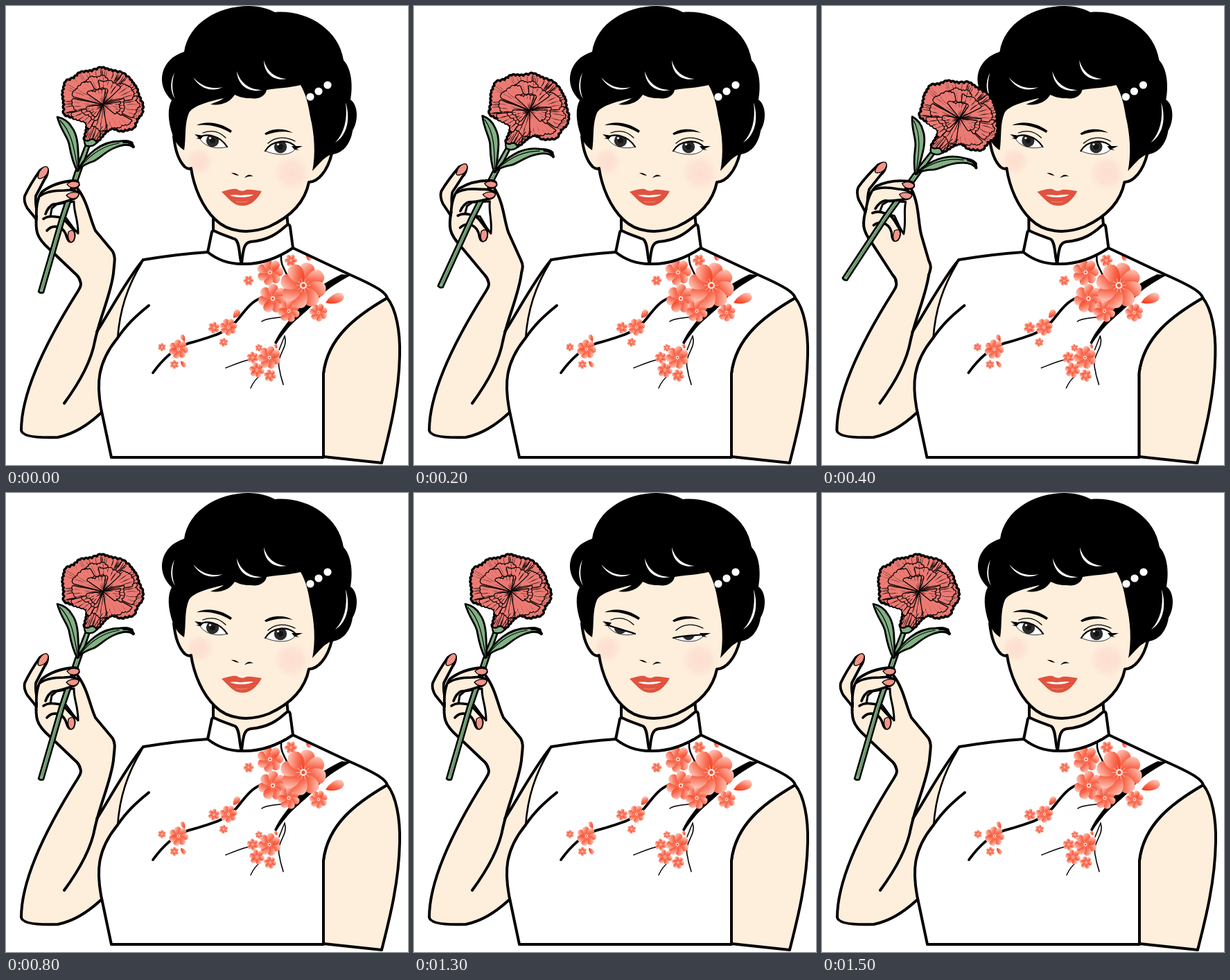
An HTML page with a canvas that plays this animation: 580x662 px, repeating every 5.5 s.

```html
<!DOCTYPE html>
<html lang="en">
<head>
<meta charset="utf-8">
<title>Woman with a carnation</title>
<style>
html, body { margin: 0; width: 100%; height: 100%; overflow: hidden; background: #fff; }
canvas { display: block; }
</style>
</head>
<body>
<canvas id="stage" width="580" height="662"></canvas>
<script>
const ctx = document.getElementById('stage').getContext('2d');
const LOOP = 5500;
const SKIN = '#feeedc', INK = '#000', GREEN = '#82b084', PINK = '#eb7a73', NAIL = '#f29488', LIP = '#e0533f';
const WRIST = [107, 400];
const JOINT = [104, 237];

// Each pose: hand turn, flower turn (degrees), place of the leaf joint, widest point of the wrist, body shift
const POSES = [
  { hand: 0, stem: 0, at: [104, 237], wrist: 360, shift: 0 },
  { hand: 5.5, stem: 8.5, at: [117, 239], wrist: 372, shift: 0 },
  { hand: 11, stem: 17.2, at: [136, 242], wrist: 373, shift: -0.6 }
];

const rad = d => d * Math.PI / 180;
const mix = (a, b, t) => a + (b - a) * t;
const mixPt = (p, q, t) => [mix(p[0], q[0], t), mix(p[1], q[1], t)];

function seeded(s) {
  return () => {
    s = (s * 1664525 + 1013904223) % 4294967296;
    return s / 4294967296;
  };
}

function fill(d, color) {
  ctx.fillStyle = color;
  ctx.fill(new Path2D(d));
}

function line(d, width = 4, color = INK) {
  ctx.lineWidth = width;
  ctx.strokeStyle = color;
  ctx.stroke(new Path2D(d));
}

function shape(d, color, width) {
  fill(d, color);
  line(d, width);
}

function disc(x, y, r, color) {
  ctx.fillStyle = color;
  ctx.beginPath();
  ctx.arc(x, y, r, 0, 7);
  ctx.fill();
}

function glow(x, y, r) {
  const g = ctx.createRadialGradient(x, y, 0, x, y, r);
  g.addColorStop(0, 'rgba(252,218,204,.8)');
  g.addColorStop(.6, 'rgba(252,220,206,.6)');
  g.addColorStop(1, 'rgba(253,230,214,0)');
  disc(x, y, r, g);
}

// ---- dress embroidery ----
function petal(x, y, angle, len, wide) {
  ctx.save();
  ctx.translate(x, y);
  ctx.rotate(angle);
  const g = ctx.createLinearGradient(len * .3, wide * .8, len * .8, -wide * .8);
  g.addColorStop(0, '#f5371a');
  g.addColorStop(.45, '#f96a4f');
  g.addColorStop(1, '#fdc3b5');
  ctx.fillStyle = g;
  ctx.beginPath();
  ctx.moveTo(0, 0);
  ctx.bezierCurveTo(len * .4, -wide, len, -wide * 1.15, len, -wide * .1);
  ctx.bezierCurveTo(len * 1.02, wide * .9, len * .45, wide, 0, 0);
  ctx.fill();
  ctx.restore();
}

function blossom(x, y, r, i) {
  const n = r > 25 ? 8 : r > 12 ? 7 : 6;
  for (let k = 0; k < n; k++) petal(x, y, i + k * 2 * Math.PI / n, r, r * .44);
  ctx.strokeStyle = '#ffd9cd';
  ctx.lineWidth = Math.max(.4, r / 45);
  for (let k = 0; k < 10; k++) {
    const a = k * Math.PI / 5;
    ctx.beginPath();
    ctx.moveTo(x, y);
    ctx.lineTo(x + Math.cos(a) * r * .3, y + Math.sin(a) * r * .3);
    ctx.stroke();
  }
  disc(x, y, r * .15, '#fff0e8');
  disc(x, y, r * .08, '#ee4a2c');
}

const BLOSSOMS = [
  [381, 384, 19], [411, 367, 9], [350, 396, 7.5], [385, 422, 21], [408, 440, 16], [429, 403, 33],
  [451, 442, 13], [321, 463, 12.5], [300, 464, 8.5], [314, 485, 6.5], [249, 495, 14], [225, 492, 6],
  [243, 517, 6.5], [380, 507, 16.5], [356, 507, 8.5], [365, 493, 5.5], [362, 525, 11], [381, 533, 9]
];
const LOOSE = [[461, 428, -.35, 28, 9], [433, 359, .9, 10, 4], [328, 450, -.9, 14, 6], [258, 484, -2, 11, 4], [252, 512, .9, 11, 4], [391, 494, -2, 7, 3]];

function embroidery() {
  fill('M484 387L498 388C476 400 458 411 447 427C428 446 414 455 402 471C396 478 393 483 390 488L387 486C395 468 412 449 426 432C440 411 461 398 484 387Z', INK);
  line('M397 361C396 372 401 378 405 387', 2.5);
  line('M368 421C352 427 343 442 332 455C318 471 300 476 262 487C240 495 225 511 212 529', 3.8);
  line('M369 455C376 449 392 451 411 446', 1.6);
  line('M402 476C408 494 388 503 395 526C396 535 399 541 400 546', 1.6);
  line('M317 522C332 516 343 511 360 508M353 551C357 542 361 537 367 533M402 476L394 496', 1.5);
  BLOSSOMS.forEach((b, i) => blossom(...b, i));
  LOOSE.forEach(p => petal(...p));
}

// ---- body ----
function body() {
  shape('M550 421C563 437 569 470 568 504C567 560 554 612 542 659L458 650V530C464 478 505 447 550 421Z', SKIN);

  fill('M198 366C228 361 260 357 291 355L340 372L414 349L495 387C520 398 536 406 543 412Q549 417 550 421C505 447 464 478 458 530V651H152L137 580C131 545 131 519 160 480C163 437 175 400 198 366Z', '#fff');
  embroidery();
  line('M458 650V530C464 478 505 447 550 421Q549 417 543 412C536 406 520 398 495 387L414 349');
  line('M291 355C260 357 228 361 198 366');

  // left arm, then the sleeve edge and bodice over it
  fill('M107 397Q110 402 104 411C78 452 22 545 22 612Q24 624 75 622C100 617 121 602 138 586C131 545 131 519 160 480C163 437 175 400 198 366C175 393 150 440 131 470C141 440 153 404 155 385Z', SKIN);
  line('M107 397Q110 402 104 411C78 452 22 545 22 612Q24 624 75 622C100 617 121 602 138 586');
  line('M84 573C106 543 123 512 128 484C135 450 152 414 155 385');
  line('M198 366C175 393 150 440 131 470');
  line('M196 370C175 405 164 438 161 480', 2.6);
  line('M206 432C185 449 174 460 160 480C131 516 131 546 137 580L152 651H458');
}

function collar() {
  fill('M299 298H405L407 325L340 350L299 330Z', SKIN);
  line('M299 302V326M405 298L407 320');
  shape('M297 326Q298 323 302 325C312 330 322 333 330 336C338 340 336 362 340 372C322 372 305 366 291 355Z', '#fff');
  shape('M340 372C342 350 344 341 353 340C378 338 392 328 404 317Q409 313 410 319L414 349C390 365 365 373 340 372Z', '#fff');
}

// ---- head ----
function lidCurve(e, open) {
  return [mixPt(e.low[0], e.up[0], open), mixPt(e.low[1], e.up[1], open)];
}

function eye(e, open) {
  const [u, v] = lidCurve(e, open);
  const lid = `M${e.a}C${u} ${v} ${e.b}`;
  ctx.save();
  const area = new Path2D(`${lid}C${e.low[1]} ${e.low[0]} ${e.a}Z`);
  ctx.fillStyle = '#fff';
  ctx.fill(area);
  ctx.clip(area);
  disc(...e.iris, 9.2, '#2b2b2d');
  disc(...e.iris, 4, '#141414');
  disc(e.iris[0] - 3.5, e.iris[1] - 3.5, 1.6, '#fff');
  ctx.restore();
  line(`M${e.a}C${e.low[0]} ${e.low[1]} ${e.b}`, .8);
  line(lid, 2.2);
  line(e.crease, 1.3);
  fill(e.wing, INK);
}

const EYES = [
  { a: [279, 190], b: [319, 203], up: [[288, 183], [308, 186]], low: [[284, 202], [303, 208]], iris: [298, 194],
    crease: 'M284 183C297 178 308 181 317 190', wing: 'M272 185L285 187L281 192L274 191L278 190Z' },
  { a: [374, 209], b: [419, 204], up: [[384, 193], [407, 191]], low: [[390, 216], [412, 217]], iris: [396, 203],
    crease: 'M378 198C389 188 404 188 417 195', wing: 'M412 202L428 202L419 206L423 208L416 207Z' }
];

function head(open) {
  const jaw = 'M242 188C244 208 250 224 258 232Q263 236 267 234C271 261 283 290 302 308C320 326 350 330 380 318C408 305 431 285 437 254C450 254 464 238 470 213';
  const face = jaw + 'L450 120L420 100H300L250 150Z';
  fill(face, SKIN);
  ctx.save();
  ctx.clip(new Path2D(face));
  glow(279, 224, 21);
  glow(412, 241, 27);
  ctx.restore();
  line(jaw);

  fill('M257 208C250 204 244 196 241 188C233 165 233 147 239 136C214 112 224 76 257 66C263 25 306 0 350 0C366 0 379 4 388 9C433 5 480 33 487 78C498 90 501 113 497 135C508 143 509 165 500 180C497 200 485 213 470 214C459 217 450 230 442 238C447 214 445 184 439 160C436 140 432 126 425 114C410 118 393 118 376 121C374 131 363 135 353 133C343 133 336 131 330 128C323 139 311 144 295 142C304 138 311 136 314 133C295 137 271 143 264 154C257 170 260 190 257 208Z', INK);

  fill('M243 96C236 110 237 124 244 134C239 122 239 110 243 96Z', '#fff');
  fill('M270 103C280 119 296 125 313 117C297 121 282 116 270 103Z', '#fff');
  fill('M333 94C334 114 350 126 370 121C351 121 338 111 333 94Z', '#fff');
  fill('M372 78C372 97 386 109 405 105C388 104 376 94 372 78Z', '#fff');
  fill('M490 139C498 165 491 187 475 197C488 183 493 164 490 139Z', '#fff');
  [[439, 131], [451, 123], [464, 114]].forEach(([x, y]) => disc(x, y, 5.6, '#fff'));

  fill('M275 172C289 165 310 168 326 180L324 183C309 174 293 170 275 172Z', INK);
  fill('M373 184C384 176 402 176 414 183C402 180 388 181 375 186Z', INK);
  EYES.forEach(e => eye(e, open));

  fill('M325 241C329 240 334 242 336 245C332 244 329 243 325 241Z', INK);
  fill('M344 248C348 243 352 242 357 246C352 245 348 246 344 248Z', INK);
  fill('M311 268C320 265 328 263 333 264Q340 269 347 265C353 264 360 266 369 267C362 280 352 289 340 288C328 288 321 277 311 268Z', LIP);
  fill('M323 273C331 272 335 273 340 273C346 272 351 272 357 272C350 277 333 277 323 273Z', '#fff');
  line('M332 282Q340 284 348 282', .7, '#f0a291');
}

// ---- carnation ----
const RIM = [
  [82, 125], [86, 109], [98, 104], [107, 96], [124, 94], [138, 89], [154, 94], [168, 97], [179, 106], [188, 118],
  [191, 130], [197, 143], [196, 155], [189, 163], [184, 176], [166, 180], [153, 175], [144, 181], [133, 194],
  [122, 199], [113, 193], [117, 177], [117, 167], [101, 162], [84, 156], [84, 142]
];
const HEART = [140, 142];

// Scalloped edge from p to q
function scallop(p, q, size) {
  const dx = q[0] - p[0], dy = q[1] - p[1];
  const n = Math.max(1, Math.round(Math.hypot(dx, dy) / size));
  let d = '';
  for (let k = 1; k <= n; k++) {
    const m = mixPt(p, q, (k - .5) / n), e = mixPt(p, q, k / n);
    d += `Q${m[0] + dy / n * .55} ${m[1] - dx / n * .55} ${e}`;
  }
  return d;
}

const OUTLINE = `M${RIM[0]}` + RIM.map((p, i) => scallop(p, RIM[(i + 1) % RIM.length], 6)).join('') + 'Z';

function vein(p, q, bend, width) {
  const m = mixPt(p, q, .5), nx = (q[1] - p[1]) * bend, ny = (p[0] - q[0]) * bend;
  fill(`M${p}Q${m[0] + nx - width} ${m[1] + ny - width} ${q}Q${m[0] + nx + width} ${m[1] + ny + width} ${p}Z`, INK);
}

function rimVeins(rnd) {
  for (let i = 0; i < 80; i++) {
    const k = Math.floor(rnd() * RIM.length);
    const p = mixPt(RIM[k], RIM[(k + 1) % RIM.length], rnd());
    vein(p, mixPt(p, HEART, .2 + rnd() * .3), (rnd() - .5) * .3, .6 + rnd() * .5);
  }
}

// One ruffled inner petal with veins from both ends
function ruffle(angle, len, spread, rnd) {
  const edge = [];
  for (let j = 0; j <= 5; j++) {
    const a = angle + spread * (j / 5 - .5), r = len * (.88 + .22 * rnd());
    edge.push([HEART[0] + Math.cos(a) * r, HEART[1] + Math.sin(a) * r * .8]);
  }
  let d = `M${HEART}L${edge[0]}`;
  for (let j = 1; j < edge.length; j++) d += scallop(edge[j - 1], edge[j], 5);
  shape(d + 'Z', PINK, 1.2);
  edge.forEach(p => {
    vein(p, mixPt(p, HEART, .2 + rnd() * .3), (rnd() - .5) * .3, .5 + rnd() * .5);
    vein(HEART, mixPt(HEART, p, .35 + rnd() * .35), (rnd() - .5) * .2, .4 + rnd() * .5);
  });
}

function carnation() {
  shape(OUTLINE, PINK, 3.4);
  ctx.save();
  ctx.clip(new Path2D(OUTLINE));
  const rnd = seeded(41);
  rimVeins(rnd);
  for (const [count, len, spread] of [[9, 47, .85], [6, 27, 1]]) {
    for (let i = 0; i < count; i++) {
      ruffle(i * 4 * Math.PI / count + rnd() * .4, len * (.85 + rnd() * .3), spread, rnd);
    }
  }
  line('M119 195L128 173M124 198L139 174M130 194L147 172', 1);
  ctx.restore();
}

function flower(pose) {
  ctx.save();
  ctx.translate(...pose.at);
  ctx.rotate(rad(pose.stem));
  ctx.translate(-JOINT[0], -JOINT[1]);
  shape('M47 412L77 309L100 239L115 200H121L107 241L83 312L54 413Q50 415 47 412Z', GREEN, 2.6);
  line('M52 408L80 312L103 242', .7, '#3f6642');
  shape('M103 238C95 224 93 210 91 199C88 187 79 179 74 160C84 162 91 168 95 175C105 188 104 208 105 237Z', GREEN, 2.8);
  line('M78 165C94 181 98 203 103 233', 1.2);
  shape('M104 236C116 214 137 195 164 195Q176 193 182 197L184 204C176 197 165 201 158 204C144 209 135 220 126 224C116 227 111 230 104 236Z', GREEN, 2.8);
  line('M108 231C124 212 142 201 163 198', 1.2);
  line('M170 196Q179 194 184 203', 4);
  carnation();
  shape('M113 193Q118 196 121 193Q127 190 131 197Q126 203 119 202Q113 203 113 193Z', GREEN, 2.4);
  ctx.restore();
}

// ---- hand ----
function inHand(pose, draw) {
  ctx.save();
  ctx.translate(...WRIST);
  ctx.rotate(rad(pose.hand));
  ctx.translate(-WRIST[0], -WRIST[1]);
  draw();
  ctx.restore();
}

function palm(pose) {
  const a = rad(pose.hand), c = Math.cos(a), s = Math.sin(a);
  const p = (x, y) => {
    const dx = x - WRIST[0], dy = y - WRIST[1];
    return [WRIST[0] + dx * c - dy * s, WRIST[1] + dx * s + dy * c];
  };
  const w = pose.wrist;
  const left = `${p(44, 300)}C${p(42, 325)} ${p(44, 334)} ${p(62, 350)}L102 388Q106 392 107 397`;
  const right = `155 385C157 ${w + 5} 158 ${w + 2} 154 ${w - 6}L${p(129, 324)}C${p(121, 307)} ${p(118, 282)} ${p(103, 263)}`;
  fill(`M${left}L${right}L${p(60, 270)}Z`, SKIN);
  line(`M${left}`);
  line(`M${right}`);
}

function nail(d) {
  shape(d, NAIL, 1.3);
}

function handBack() {
  shape('M44 308L31 292Q25 282 27 274C34 259 42 247 49 237Q57 231 60 236Q61 243 55 251L43 274Q42 284 45 298', SKIN, 3.8);
  nail('M46 247Q47 237 55 232Q61 230 61 237Q59 246 52 248Q47 250 46 247Z');
  shape('M73 286L98 282C98 300 104 306 104 328L97 320L86 305L64 304L66 292Z', '#fff', 3);
  shape('M54 307Q61 302 72 304C84 304 88 314 96 321Q101 330 97 338Q91 343 88 334Q85 322 76 319Q66 316 59 324', SKIN, 3.6);
  nail('M90 326Q97 320 99 329Q100 338 94 341Q88 338 90 326Z');
}

function handFront() {
  fill('M44 305C43 288 46 276 52 268C64 259 80 253 98 252Q105 252 105 258Q102 263 94 264L60 275Z', SKIN);
  line('M44 305C43 288 46 276 52 268C64 259 80 253 98 252Q105 252 105 258Q102 263 94 263', 3.8);
  nail('M88 257Q96 250 105 255Q107 260 100 262Q92 263 88 257Z');
  shape('M48 275C56 268 70 266 84 266Q98 264 104 269Q105 275 98 278C88 281 80 285 68 286Q61 289 57 300', SKIN, 3.6);
  nail('M87 273Q95 266 105 270Q105 277 97 278Q91 278 87 273Z');
}

// ---- timing ----
function poseAt(t) {
  return t < 800 ? [0, 1, 2, 1][Math.floor(t / 200)] : 0;
}

function eyesAt(t) {
  if (t < 1300 || t >= 1500) return 1;
  return t < 1400 ? .45 : 0;
}

function draw(step, open) {
  const pose = POSES[step];
  ctx.fillStyle = '#fff';
  ctx.fillRect(0, 0, 580, 662);
  ctx.lineCap = ctx.lineJoin = 'round';
  ctx.save();
  ctx.translate(pose.shift, 0);
  body();
  collar();
  head(open);
  ctx.restore();
  palm(pose);
  inHand(pose, handBack);
  flower(pose);
  inHand(pose, handFront);
}

let shown = '';
function tick() {
  const t = performance.now() % LOOP;
  const step = poseAt(t), open = eyesAt(t), key = step + ':' + open;
  if (key !== shown) {
    draw(step, open);
    shown = key;
  }
  requestAnimationFrame(tick);
}
tick();
</script>
</body>
</html>
```
